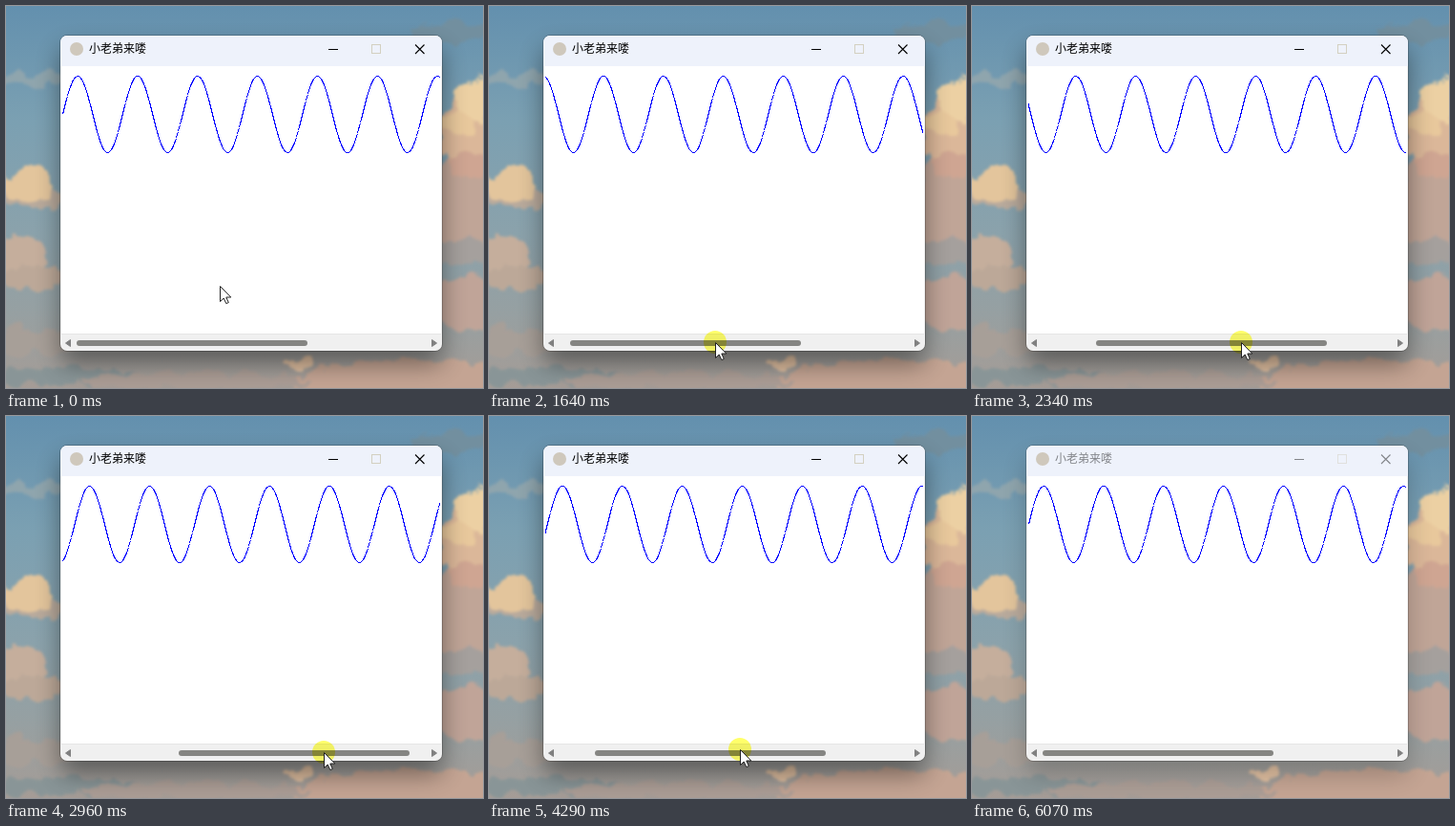
Animation of 500x400 px, one loop 6160 ms. Source, as an HTML page:

```html
<!DOCTYPE html>
<html lang="zh">
<head>
<meta charset="utf-8">
<title>小老弟来喽</title>
<style>
  html, body { margin: 0; width: 100%; height: 100%; overflow: hidden; }
  svg { position: absolute; left: 0; top: 0; width: 500px; height: 400px; }
  #sky { will-change: transform; }
  #halo { mix-blend-mode: multiply; }
  text { font: 12px "Noto Sans CJK SC", "Noto Sans CJK", sans-serif; }
</style>
</head>
<body>
<svg id="sky" viewBox="0 0 500 400">
  <defs>
    <linearGradient id="air" x2="0" y2="1">
      <stop offset="0" stop-color="#6390ae"/>
      <stop offset=".3" stop-color="#7ba0b2"/>
      <stop offset=".6" stop-color="#8ba2ab"/>
      <stop offset=".8" stop-color="#96a0a2"/>
      <stop offset="1" stop-color="#a59c96"/>
    </linearGradient>
    <filter id="paint" x="-10%" y="-10%" width="120%" height="120%">
      <feTurbulence type="fractalNoise" baseFrequency=".05" numOctaves="3" seed="4"/>
      <feDisplacementMap in="SourceGraphic" scale="22" xChannelSelector="R" yChannelSelector="G"/>
      <feGaussianBlur stdDeviation="1.6"/>
    </filter>
  </defs>
  <rect width="500" height="400" fill="url(#air)"/>
  <g id="clouds" filter="url(#paint)"></g>
</svg>

<svg viewBox="0 0 500 400">
  <defs>
    <clipPath id="frame"><rect x="57" y="31" width="400" height="330" rx="7"/></clipPath>
    <clipPath id="view"><rect x="59" y="63" width="396" height="280"/></clipPath>
    <filter id="soft" x="-20%" y="-20%" width="140%" height="140%"><feGaussianBlur stdDeviation="13"/></filter>
  </defs>
  <rect id="shadow" x="57" y="45" width="400" height="330" rx="8" filter="url(#soft)"/>
  <rect x="56.5" y="30.5" width="401" height="331" rx="7.5" fill="none" stroke="#000" stroke-opacity=".2"/>
  <g clip-path="url(#frame)">
    <rect x="57" y="31" width="400" height="330" fill="#f0f0f0"/>
    <rect x="57" y="31" width="400" height="32" fill="#eef2fb"/>
    <rect x="58" y="63" width="398" height="280" fill="#fff"/>
    <path d="M58 343.5H456" stroke="#e6e6e6"/>
  </g>

  <circle cx="74" cy="45" r="7" fill="#cfc8bc"/>
  <g id="caption">
    <text x="87" y="49.3">小老弟来喽</text>
    <path d="M338 45.5H348" stroke="#000" shape-rendering="crispEdges"/>
    <path d="M429 40.5L438.5 50M438.5 40.5L429 50" stroke="#000" stroke-width="1.1"/>
  </g>
  <rect id="maximize" x="383.5" y="40.5" width="9" height="9" fill="none" stroke="#d3d0c0"/>

  <g clip-path="url(#view)">
    <polyline id="wave" fill="none" stroke="#00f" shape-rendering="crispEdges"/>
  </g>

  <g fill="#808080" stroke="#808080" stroke-linejoin="round">
    <path d="M62.5 353L67.5 349.5V356.5Z"/>
    <path d="M451.5 353L446.5 349.5V356.5Z"/>
  </g>
  <rect id="thumb" y="350" width="242" height="6" rx="3" fill="#858582"/>

  <circle id="halo" r="12" fill="#ffff6a"/>
  <path id="cursor" d="M.5.5V16.5L4.2 13L6.8 18.6L9.3 17.5L6.8 12H11.8Z" fill="#fff" stroke="#222" stroke-linejoin="round"/>
</svg>

<script>
const LOOP = 6160, STEP = 77.8, START = 70;
const GRAB_X = 226, THUMB_X = 74, THUMB_RANGE = 124, SCROLL_RANGE = 204;
const PRESS = 1200, RELEASE = 5060, EXIT = 5510, BLUR = 5690;
const $ = id => document.getElementById(id);

// cx, cy, rx, ry, colour
const clouds = [
  [20, 76, 50, 7, '#8fa5ad'],
  [470, 26, 45, 10, '#728f9f'],
  [24, 200, 36, 12, '#b9aa9c'],
  [22, 188, 28, 17, '#e3c59c'],
  [8, 262, 34, 22, '#c5ae9c'],
  [28, 284, 36, 13, '#bca898'],
  [25, 350, 60, 12, '#a79f98'],
  [50, 387, 90, 9, '#899597'],
  [490, 205, 42, 60, '#c0a597'],
  [492, 130, 38, 45, '#dbb799'],
  [496, 98, 28, 22, '#ecd0a3'],
  [470, 122, 18, 12, '#e8c89c'],
  [488, 165, 24, 14, '#cfa592'],
  [480, 258, 40, 12, '#a5a09d'],
  [485, 310, 46, 30, '#c0a498'],
  [430, 392, 130, 22, '#c4a493'],
  [200, 392, 120, 9, '#ab9d95'],
  [305, 374, 18, 4, '#e0bfa0']
];
$('clouds').innerHTML = clouds.map(([x, y, rx, ry, fill]) =>
  `<ellipse cx="${x + 1}" cy="${y + 1}" rx="${rx}" ry="${ry}" fill="${fill}"/>`).join('');

$('wave').setAttribute('points', Array.from({ length: 597 }, (_, x) =>
  `${x + .5},${Math.round(113 - 40 * Math.sin(x / 10)) + .5}`).join(' '));

// time, x, y of the pointer tip
const pointer = [
  [0, 224, 293], [60, 224, 293], [260, 330, 340], [440, 427, 382], [615, 415, 379],
  [900, 320, 366], [1150, 238, 352], [1240, 226, 349], [1380, 226, 350],
  [1626, 237, 352], [2326, 282, 352], [2948, 333, 352], [3220, 358, 352],
  [3649, 377, 352], [3900, 347, 351], [4271, 263, 349], [4700, 238, 350],
  [5000, 224, 352], [5271, 240, 357], [5360, 292, 374], [5440, 358, 397]
];

function pointerAt(t) {
  const i = pointer.findIndex(p => p[0] > t);
  if (i < 0) return pointer[pointer.length - 1].slice(1);
  const [a, b] = [pointer[i - 1], pointer[i]];
  const k = (t - a[0]) / (b[0] - a[0]);
  return [1, 2].map(n => Math.round(a[n] + (b[n] - a[n]) * k));
}

const clamp = (v, lo, hi) => Math.min(hi, Math.max(lo, v));
const move = (id, x, y) => $(id).setAttribute('transform', `translate(${x} ${y})`);
const show = (id, on) => $(id).setAttribute('visibility', on ? 'visible' : 'hidden');

function render(time) {
  const t = time < START ? 0 : START + Math.floor((time - START) / STEP) * STEP;
  const [x, y] = pointerAt(t);
  const pressed = t >= PRESS && t < RELEASE;
  const drag = pressed ? clamp(x - GRAB_X, 0, THUMB_RANGE) : 0;

  move('cursor', x, y);
  move('halo', x, y);
  show('cursor', t < EXIT);
  show('halo', pressed);
  $('thumb').setAttribute('x', THUMB_X + drag);
  move('wave', 59 - Math.round(drag * SCROLL_RANGE / THUMB_RANGE), 0);

  const inactive = clamp((time - BLUR + STEP) / 230, 0, 1) * (time >= BLUR);
  $('caption').setAttribute('opacity', 1 - .55 * inactive);
  $('maximize').setAttribute('opacity', 1 - .5 * inactive);
  $('shadow').setAttribute('opacity', .42 - .2 * inactive);
}

const origin = performance.now();
function tick() {
  render((performance.now() - origin) % LOOP);
  requestAnimationFrame(tick);
}
tick();
</script>
</body>
</html>
```
